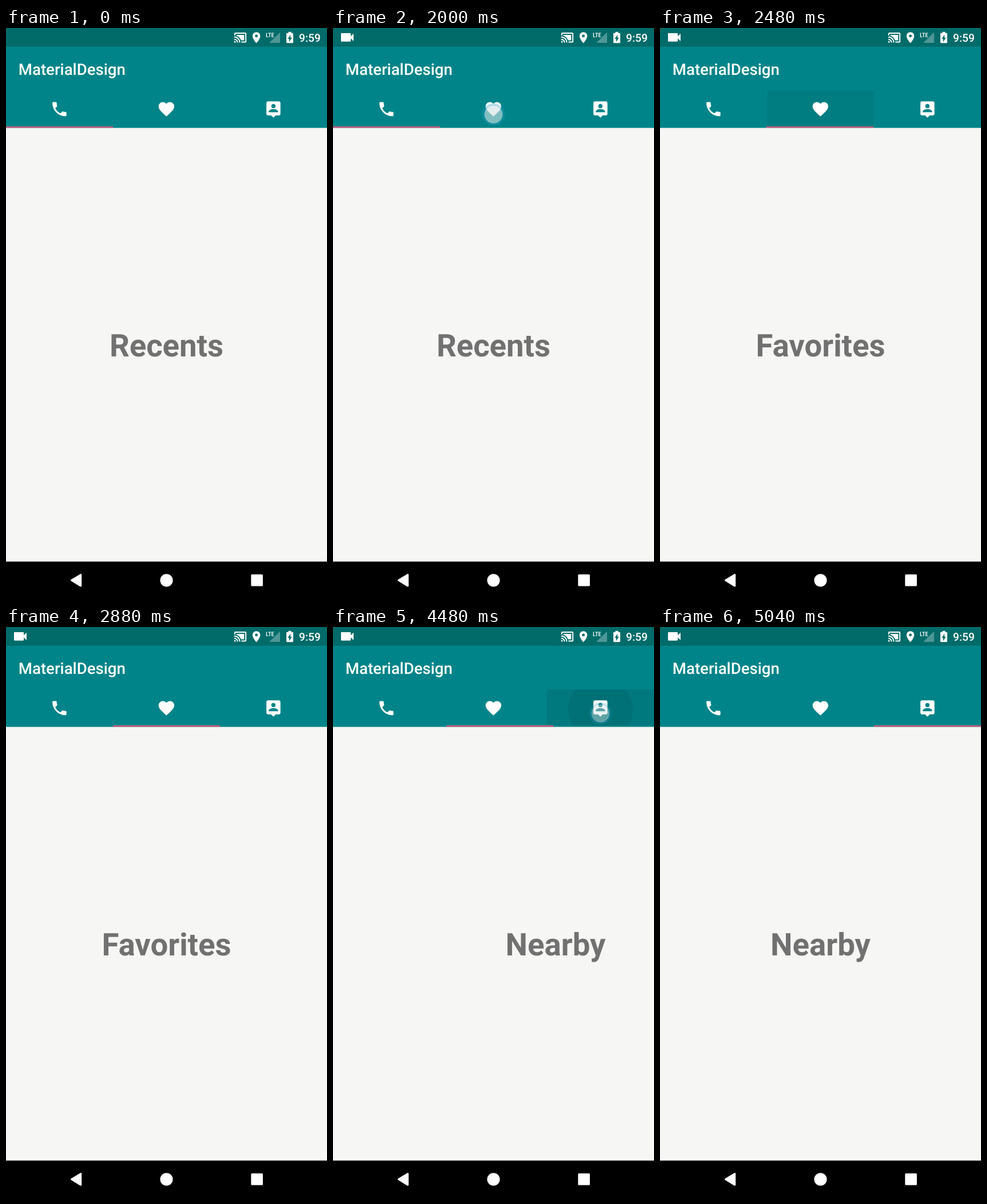
Animation of 561x998 px, one loop 5.28 s. Source, as an HTML page:

```html
<!DOCTYPE html>
<html lang="en">
<head>
<meta charset="utf-8">
<title>Tabs</title>
<style>
  html, body { margin: 0; width: 100%; height: 100%; overflow: hidden; background: #f6f6f4; }
  svg { display: block; width: 100%; height: 100%; }
  text { font-family: Roboto, sans-serif; font-weight: 500; fill: #fff; text-rendering: geometricPrecision; }
  .page { font-size: 54.5px; font-weight: 700; fill: #717171; text-anchor: middle; }
</style>
</head>
<body>
<svg viewBox="0 0 561 998">
  <defs>
    <radialGradient id="spot">
      <stop offset="0" stop-color="#d2e2e2" stop-opacity=".62"/>
      <stop offset=".66" stop-color="#d2e2e2" stop-opacity=".62"/>
      <stop offset=".71" stop-color="#e2f0f2" stop-opacity=".68"/>
      <stop offset=".76" stop-color="#3aa0c0" stop-opacity=".5"/>
      <stop offset="1" stop-color="#3aa0c0" stop-opacity="0"/>
    </radialGradient>
    <clipPath id="tab"><rect id="tabBox" y="109" width="187" height="63.5"/></clipPath>
  </defs>

  <rect width="561" height="998" fill="#f6f6f4"/>
  <g id="pages">
    <text class="page" x="280.5" y="574.2">Recents</text>
    <text class="page" x="841.5" y="574.2">Favorites</text>
    <text class="page" x="1402.5" y="574.2">Nearby</text>
  </g>

  <rect width="561" height="174.6" fill="#008489"/>
  <rect width="561" height="32.7" fill="#006b69"/>
  <text x="21.8" y="81.5" font-size="27.6">MaterialDesign</text>

  <g clip-path="url(#tab)">
    <rect id="shade" y="109" width="187" height="63.5"/>
    <circle id="wave" cy="143"/>
  </g>
  <rect id="indicator" y="172" width="187" height="2.4" fill="#d2587a"/>

  <!-- tab icons -->
  <g fill="#fff">
    <path transform="translate(77 125.5) scale(1.364)" d="M6.62 10.79c1.44 2.83 3.76 5.14 6.59 6.59l2.2-2.2c.27-.27.67-.36 1.02-.24 1.12.37 2.33.57 3.57.57.55 0 1 .45 1 1V20c0 .55-.45 1-1 1C10.61 21 3 13.39 3 4c0-.55.45-1 1-1h3.5c.55 0 1 .45 1 1 0 1.25.2 2.45.57 3.57.11.35.03.74-.25 1.02z"/>
    <path transform="translate(264 125.5) scale(1.364)" d="M12 21.35l-1.45-1.32C5.4 15.36 2 12.28 2 8.5 2 5.42 4.42 3 7.5 3c1.74 0 3.41.81 4.5 2.09C13.09 3.81 14.76 3 16.5 3 19.58 3 22 5.42 22 8.5c0 3.78-3.4 6.86-8.55 11.54z"/>
    <path transform="translate(451 125.5) scale(1.364)" d="M19 2H5C3.9 2 3 2.9 3 4v14c0 1.1.9 2 2 2h4l3 3 3-3h4c1.1 0 2-.9 2-2V4c0-1.1-.9-2-2-2zm-7 3.3a2.7 2.7 0 0 1 0 5.4a2.7 2.7 0 0 1 0-5.4zM18 16H6v-.9c0-2 4-3.1 6-3.1s6 1.1 6 3.1z" fill-rule="evenodd"/>
  </g>

  <!-- status bar -->
  <g fill="#fff" fill-rule="evenodd">
    <path id="camera" transform="translate(10.3 1.7) scale(1.22)" d="M17 10.5V7c0-.55-.45-1-1-1H4c-.55 0-1 .45-1 1v10c0 .55.45 1 1 1h12c.55 0 1-.45 1-1v-3.5l4 4v-11z"/>
    <path transform="translate(397.9 5.2) scale(.966)" d="M1 18v3h3c0-1.66-1.34-3-3-3zm0-4v2c2.76 0 5 2.24 5 5h2c0-3.87-3.13-7-7-7zM19 7H5v1.63c3.96 1.28 7.09 4.41 8.37 8.37H19zM1 10v2c4.97 0 9 4.03 9 9h2c0-6.08-4.93-11-11-11zM21 3H3c-1.1 0-2 .9-2 2v3h2V5h18v14h-7v2h7c1.1 0 2-.9 2-2V5c0-1.1-.9-2-2-2z"/>
    <path transform="translate(426 5.2) scale(.966)" d="M12 2a7 7 0 0 0-7 7c0 5.25 7 13 7 13s7-7.75 7-13a7 7 0 0 0-7-7zm0 4.5a2.5 2.5 0 0 1 0 5a2.5 2.5 0 0 1 0-5z"/>
    <path d="M479 7.5V26H460z" fill-opacity=".3"/>
    <path transform="translate(481.6 4.8) scale(1.2 .98)" d="M15.67 4H14V2h-4v2H8.33C7.6 4 7 4.6 7 5.33v15.33C7 21.4 7.6 22 8.33 22h7.33c.74 0 1.34-.6 1.34-1.33V5.33C17 4.6 16.4 4 15.67 4zM11 20v-5.5H9L13 7v5.5h2z"/>
  </g>
  <text x="454" y="15.5" style="font:500 10.5px 'Roboto Condensed',Roboto,sans-serif;font-stretch:75%">LTE</text>
  <text x="512" y="23.8" font-size="19.2">9:59</text>

  <!-- navigation bar -->
  <rect y="932.6" width="561" height="66"/>
  <g fill="#fff" stroke="#fff" stroke-width="3" stroke-linejoin="round">
    <path d="M114.5 965.3L130.7 955.5V975.1z"/>
    <circle cx="280.5" cy="965.3" r="9.6"/>
    <rect x="429.8" y="956.5" width="17.6" height="17.6"/>
  </g>

  <circle id="touch" cy="151" r="21" fill="url(#spot)"/>
</svg>
<script>
const LOOP = 5280, STEP = 40, PAGE = 561, TAB = 187;
const TAPS = [
  { tab: 1, down: 2000, up: 2195, slide: 2210 },
  { tab: 2, down: 4240, up: 4424, slide: 4437 }
];
const el = id => document.getElementById(id);
const set = (id, attrs) => {
  for (const name in attrs) el(id).setAttribute(name, attrs[name]);
};
const progress = (t, start, length) => Math.min(1, Math.max(0, (t - start) / length));
const quintOut = p => 1 - (1 - p) ** 5;

// cubic-bezier(.4, 0, .2, 1), solved by bisection
function fastOutSlowIn(p) {
  let low = 0, high = 1, s;
  for (let i = 0; i < 24; i++) {
    s = (low + high) / 2;
    const x = 1.2 * s * (1 - s) ** 2 + 0.6 * s * s * (1 - s) + s ** 3;
    if (x < p) low = s; else high = s;
  }
  return s * s * (3 - 2 * s);
}

function drawTap(t, { tab, down, up }) {
  const press = down + 100, center = TAB * (tab + 0.5);
  const grow = 25 + 15 * progress(t, press, up - press) + 59 * progress(t, up, 200);
  const pressed = progress(t, press - 20, 100);
  set('tabBox', { x: TAB * tab });
  set('shade', { x: TAB * tab, opacity: 0.09 * pressed * (1 - progress(t, up, 610)) });
  set('wave', { cx: center, r: grow, opacity: t < press ? 0 : 0.08 * (1 - progress(t, up, 333)) });
  set('touch', { cx: center, opacity: t < down ? 0 : 1 - progress(t, up, 200) });
}

function draw(t) {
  let page = 0, mark = 0;
  for (const tap of TAPS) {
    page += quintOut(progress(t, tap.up, 200));
    mark += fastOutSlowIn(progress(t, tap.slide, 300));
  }
  set('pages', { transform: `translate(${-PAGE * page} 0)` });
  set('indicator', { x: TAB * mark });
  set('camera', { opacity: progress(t, 40, 320) });
  drawTap(t, t < TAPS[1].down ? TAPS[0] : TAPS[1]);
}

const begin = performance.now();
function tick() {
  const t = (performance.now() - begin) % LOOP;
  draw(Math.floor(t / STEP) * STEP);
  requestAnimationFrame(tick);
}
tick();
</script>
</body>
</html>
```
